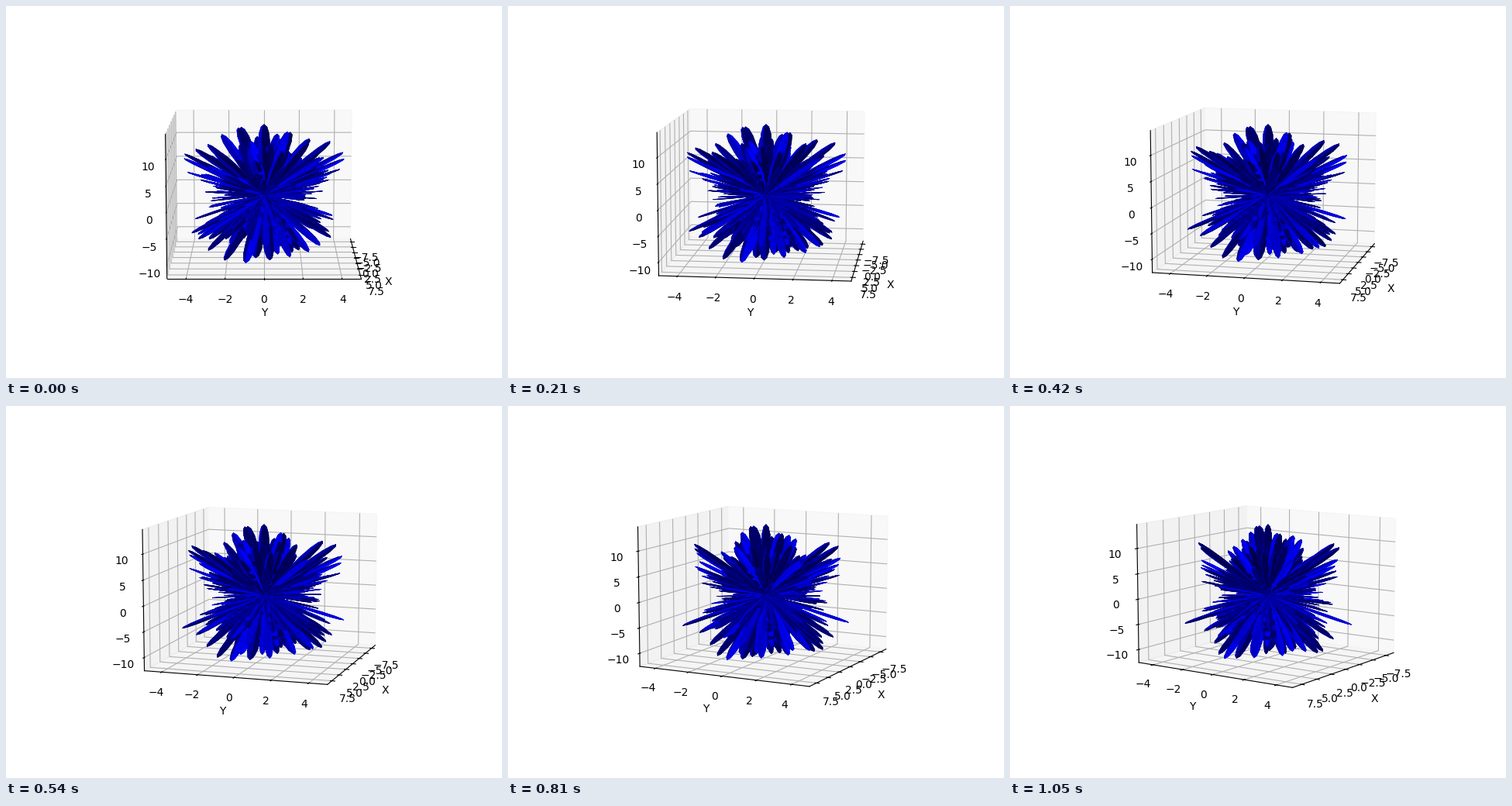
Recreate the animation shown at these times as a matplotlib script. Size 640 by 480 pixels, loop 1.08 s.

```python
import numpy as np
import matplotlib.pyplot as plt
from matplotlib.animation import FuncAnimation
from mpl_toolkits.mplot3d.art3d import Poly3DCollection

FRAMES, INTERVAL = 36, 30
SIDES, RINGS = 4, 7
FILL = 150

rng = np.random.default_rng(11)

# Tips of the outer lobes; each has a twin half a turn around z.
OUTER = np.array([
    (-1.7, -1.24, 13.1), (1.6, 1.39, 13.0), (-2.9, -2.3, 11.3),
    (-4.2, -3.1, 8.9), (0.5, -4.25, 8.4), (-4.8, 2.5, 9.9),
    (-2.6, 3.6, 10.0), (0.1, 4.3, 7.3), (-0.9, 4.1, 4.9),
    (4.4, -3.8, -5.8), (3.0, -2.1, -11.8), (4.8, -0.97, -11.5),
    (6.0, 0.3, -10.4), (5.8, 1.35, -9.9), (3.7, 2.35, -9.8),
    (1.5, -3.0, -10.5), (2.0, -3.5, -8.0), (1.5, 3.0, -9.5),
    (0.8, 3.6, -8.2),
])


def inner_tips(n):
    """Random tips inside an ellipsoid that is pinched at the waist."""
    s = rng.normal(size=(n, 3))
    s /= np.linalg.norm(s, axis=1, keepdims=True)
    waist = 0.68 + 0.32 * np.minimum(1, 2.2 * np.abs(s[:, 2]))
    reach = rng.uniform(0.62, 0.95, n) * waist
    return s * reach[:, None] * (8.6, 4.6, 13.0)


def lobe(tip, inward):
    """Quads of a slender rounded lobe from the centre to its tip."""
    length = np.linalg.norm(tip)
    axis = tip / length
    side = np.cross(axis, (0.31, 0.9, 0.3))
    side /= np.linalg.norm(side)
    up = np.cross(axis, side)
    t = np.sin(np.linspace(0, np.pi / 2, RINGS))
    width = 0.024 * length * (2 * t * np.sqrt(np.maximum(0, 1 - t**2)) + 0.02)
    a = np.linspace(0, 2 * np.pi, SIDES + 1) + rng.uniform(0, np.pi)
    if inward:
        a = a[::-1]
    ring = np.cos(a)[:, None] * side + np.sin(a)[:, None] * up
    p = t[:, None, None] * tip + width[:, None, None] * ring
    quads = np.stack([p[:-1, :-1], p[1:, :-1], p[1:, 1:], p[:-1, 1:]], axis=2)
    return quads.reshape(-1, 4, 3)


half = np.vstack([OUTER, inner_tips(FILL)])
tips = np.vstack([half, half * (-1, -1, 1), [(0, 0, 14.1)]])
verts = np.concatenate([lobe(tip, rng.random() < 0.6) for tip in tips])

fig = plt.figure(figsize=(6.4, 4.8), dpi=100)
ax = fig.add_subplot(projection="3d")
ax.add_collection3d(Poly3DCollection(
    verts, facecolors="b", edgecolors="b", linewidths=0.3, shade=True))
ax.set(xlim=(-9, 9), ylim=(-4.98, 4.98), zlim=(-12.6, 14.7),
       xlabel="X", ylabel="Y")


def update(i):
    ax.view_init(elev=10, azim=i)
    return ()


anim = FuncAnimation(fig, update, frames=FRAMES, interval=INTERVAL,
                     repeat=True, repeat_delay=0)
plt.show()
```
